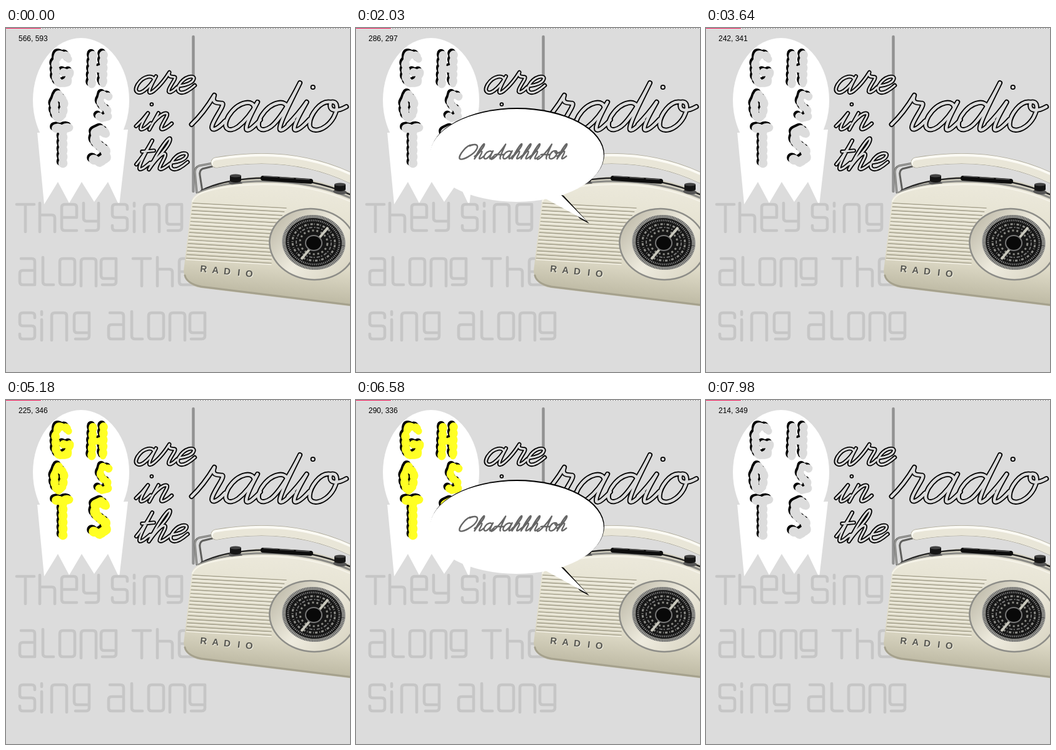
These frames come from a looping animation (550 by 552 pixels, 8000 ms). An HTML page with a canvas:

```html
<!DOCTYPE html>
<html lang="en">
<head>
<meta charset="utf-8">
<title>Ghosts are in the radio</title>
<style>
html, body { margin: 0; width: 100%; height: 100%; overflow: hidden; background: #dcdcdc; }
canvas { display: block; }
</style>
</head>
<body>
<canvas id="stage" width="550" height="552" aria-label="Ghosts are in the radio. They sing along the sing along"></canvas>
<script>
const ctx = document.getElementById('stage').getContext('2d');
const BG = '#dcdcdc';
const LOOP = 8000, STEP = 70;

// Pointer moves: start, end, x, y
const START = [566, 593];
const MOVES = [
  [0, 350, 340, 276], [1330, 1400, 324, 283], [1400, 1820, 240, 310],
  [1890, 2030, 286, 297], [2030, 2240, 322, 287], [2450, 2800, 338, 298],
  [2870, 2940, 338, 299], [3220, 3640, 242, 341], [3640, 3920, 215, 346],
  [4200, 4410, 211, 348], [5110, 5810, 347, 326], [6230, 7070, 210, 349],
  [7840, 7980, 214, 349]
];

// Slanted handwriting, x-height 100: path and advance
const SCRIPT = {
  a: ['M94-76C80-108 22-104 8-50C0-4 36 10 60-12C80-32 92-62 97-98C90-50 86-4 100-1C112 1 122-16 135-36', 125],
  r: ['M0-20C18-45 34-85 42-122C44-92 66-96 84-94C98-90 78-44 80-18C82 4 104 2 122-32', 120],
  e: ['M8-40C50-44 86-60 82-84C76-106 20-102 10-45C5-4 42 10 70-10C85-20 95-32 104-44', 110],
  i: ['M-8-20C8-44 22-76 29-98C22-60 12-4 28-1C42 1 55-18 66-38M30-150h.1', 65],
  n: ['M8 0L22-98M12-38C26-74 52-106 70-95C84-84 62-30 70-8C76 6 98-4 118-36', 115],
  t: ['M0-30C16-62 30-120 38-172C28-100 14-5 34-1C48 1 62-18 78-40M4-106L72-112', 75],
  h: ['M0-30C40-60 78-150 66-180C55-205 25-130 12 0C25-50 50-104 70-93C88-82 62-20 74-4C85 6 105-14 122-34', 120],
  d: ['M94-76C80-108 22-104 8-50C0-4 36 10 60-12C84-36 98-110 104-165C96-90 86-4 102-1C114 1 124-16 137-36', 130],
  o: ['M56-98C10-106-2-50 8-24C18 12 80 8 90-45C95-86 74-102 56-98C58-66 92-62 122-82', 110],
  O: ['M110-170C30-180-20-40 10-5C60 30 190-60 190-130C190-180 130-190 80-160', 200],
  A: ['M-6 6C30 4 82-100 104-180C100-100 88-20 110-1M14-50C50-70 80-40 128-54', 130]
};

// Monoline block letters in a 24 x 42 box
const BLOCK = {
  s: 'M24 8V5q0-5-5-5H5q-5 0-5 5V16q0 5 5 5H19q5 0 5 5V37q0 5-5 5H5q-5 0-5-5V34',
  i: 'M0 11V44M0-2V3',
  n: 'M0 44V5q0-5 5-5H19q5 0 5 5V44',
  g: 'M24 32H5q-5 0-5-5V5q0-5 5-5H24V37q0 5-5 5H2',
  a: 'M2 0H19q5 0 5 5V42H5q-5 0-5-5V24q0-5 5-5H24',
  l: 'M0-2V37q0 5 5 5H17',
  o: 'M5 0H19q5 0 5 5V37q0 5-5 5H5q-5 0-5-5V5q0-5 5-5Z',
  t: 'M-4 0H24M10 0V44',
  h: 'M0-2V44M0 17H19q5 0 5 5V44',
  e: 'M24 42H5q-5 0-5-5V5q0-5 5-5H19q5 0 5 5V21H0',
  y: 'M0-2V22q0 5 5 5H24M24-2V37q0 5-5 5H4'
};
const LYRICS = [
  ['theysing', 283, [21, 54, 89, 124, 170, 205, 221, 257]],
  ['alongthe', 370, [22, 59, 86, 120, 152, 207, 242, 277]],
  ['singalong', 457, [22, 57, 73, 109, 164, 201, 228, 262, 294]]
];

// Dripping letters: radius, then strokes as points
const GHOSTLY = [
  [6, [100, 50, 95, 43, 84, 43, 79, 56, 80, 82, 86, 90, 98, 87, 102, 71, 92, 71]],
  [6, [139, 43, 137, 90], [156, 43, 155, 90], [138, 66, 156, 66]],
  [6, [84, 107, 77, 118, 78, 138, 84, 146, 91, 140, 93, 118, 84, 107]],
  [5.5, [164, 110, 155, 107, 150, 116, 153, 125, 162, 131, 163, 142, 153, 146, 149, 142]],
  [6.5, [80, 161, 101, 160], [91, 162, 91, 217]],
  [7, [160, 170, 152, 163, 143, 168, 142, 182, 150, 190, 159, 196, 160, 208, 150, 215, 140, 211]]
];

const shape = d => new Path2D(d);
const fill = (path, color) => { ctx.fillStyle = color; ctx.fill(path); };
const stroke = (path, color, width) => {
  ctx.strokeStyle = color;
  ctx.lineWidth = width;
  ctx.stroke(path);
};
function ellipse(x, y, rx, ry, tilt = 0) {
  const path = new Path2D();
  path.ellipse(x, y, rx, ry, tilt, 0, 7);
  return path;
}
function gradient(x0, y0, x1, y1, ...colors) {
  const g = ctx.createLinearGradient(x0, y0, x1, y1);
  colors.forEach((c, i) => g.addColorStop(i / (colors.length - 1), c));
  return g;
}

function handwriting(word, x, y, sx, sy = sx) {
  const path = new Path2D();
  for (const c of word) {
    const [d, advance] = SCRIPT[c];
    path.addPath(shape(d), new DOMMatrix([sx, 0, -.4 * sy, sy, x, y]));
    x += advance * sx;
  }
  return path;
}

function lumpy() {
  const path = new Path2D();
  for (const [radius, ...lines] of GHOSTLY) for (const p of lines) {
    for (let k = 2; k < p.length; k += 2) {
      const dx = p[k] - p[k - 2], dy = p[k + 1] - p[k - 1], n = Math.ceil(Math.hypot(dx, dy));
      for (let j = 0; j <= n; j++) {
        const x = p[k - 2] + dx * j / n, y = p[k - 1] + dy * j / n;
        const r = radius + .9 * Math.sin(x * .45 + y * .6);
        path.moveTo(x + r, y);
        path.arc(x, y, r, 0, 7);
      }
    }
  }
  return path;
}

const letters = lumpy();
const titles = [
  [handwriting('are', 203, 104, .27), 6.6, 3],
  [handwriting('in', 208, 163, .29, .27), 6.6, 3],
  [handwriting('the', 205, 227, .27), 6.6, 3],
  [handwriting('radio', 293, 164, .42, .46), 8.2, 4.6]
];
const chant = handwriting('OhaAahhhAoh', 164, 210, .12, .13);

function drawTopEdge() {
  for (let x = 0; x < 550; x += 4) {
    ctx.fillStyle = '#fff';
    ctx.fillRect(x, 0, 2, 1);
    ctx.fillStyle = '#999';
    ctx.fillRect(x + 2, 0, 2, 1);
  }
  ctx.fillStyle = '#f5205f';
  ctx.fillRect(0, 0, 56, 1);
}

function drawGhost(lit) {
  fill(ellipse(120, 116, 77, 100), '#fff');
  fill(shape('M50 168L61 283L83 247L101 281L121 247L141 279L163 247L181 285L195 163Z'), '#fff');
  ctx.save();
  ctx.translate(-3, -3);
  fill(letters, '#000');
  ctx.restore();
  fill(letters, lit ? '#ffff24' : BG);
}

function drawLyrics() {
  for (const [text, y, xs] of LYRICS) xs.forEach((x, i) => {
    ctx.save();
    ctx.translate(x, y);
    stroke(shape(BLOCK[text[i]]), '#c6c6c6', 4.6);
    ctx.restore();
  });
}

function drawDial() {
  const tilt = .12;
  const ring = (rx, ry, color, width) => stroke(ellipse(492, 344, rx, ry, tilt), color, width);
  fill(ellipse(490, 347, 70, 58, tilt), '#8d8d88');
  fill(ellipse(490, 347, 67.5, 55.5, tilt), gradient(430, 300, 545, 400, '#bdb9a8', '#eeebde', '#d8d4c2'));
  fill(ellipse(492, 344, 51, 44, tilt), '#a9a9a5');
  ctx.lineCap = 'butt';
  ctx.setLineDash([1, 1.5]);
  ring(47, 41, '#4a4a48', 6);
  ctx.setLineDash([]);
  fill(ellipse(492, 344, 45, 39, tilt), '#171717');
  for (const [r, dash, width, color] of [
    [41, [1, 2], 3, '#aaa'], [34, [4, 2, 1, 3], 3, '#8c8c88'],
    [28, [2, 2, 5, 3], 2, '#777'], [22, [3, 4], 3, '#8a8a84']
  ]) {
    ctx.setLineDash(dash);
    ring(r, r * .86, color, width);
  }
  ctx.setLineDash([]);
  stroke(shape('M515 320L472 371'), '#c9c8bd', 4);
  fill(ellipse(492, 345, 14, 13), '#777');
  fill(ellipse(492, 345, 12, 11), '#090909');
  ctx.lineCap = 'round';
}

function drawKnob(x, y) {
  fill(ellipse(x, y + 9, 11, 4, .1), '#555');
  ctx.fillStyle = '#151515';
  ctx.fillRect(x - 9, y - 3, 18, 8);
  fill(ellipse(x, y + 5, 9, 3), '#151515');
  fill(ellipse(x, y - 3, 9, 2.5), '#444');
}

function drawRadio() {
  stroke(shape('M330 217L309 221Q302 223 302 232L305 264M330 222L314 226Q309 229 310 236L314 262'), '#5f5f5d', 3);
  stroke(shape('M330 217L309 221Q302 223 302 232L305 264'), '#c9c9c6', 1);
  const handle = shape('M336 216C400 205 480 204 560 245');
  stroke(handle, '#aaa694', 17);
  stroke(handle, '#fbfaf4', 15.5);
  stroke(shape('M336 218C400 207 480 206 560 247'), '#e9e6d8', 11);

  // Top plate with chrome rim
  fill(shape('M303 268Q335 245 400 239Q490 234 556 267V300H303Z'), '#d4d1c2');
  stroke(shape('M312 261Q345 244 400 241Q490 238 556 270'), '#262626', 2.5);
  stroke(shape('M308 264Q345 248 400 246Q490 244 556 275'), '#8b8b87', 3);
  drawKnob(367, 240);
  drawKnob(534, 254);
  stroke(shape('M411 241L487 246'), '#0d0d0d', 8);
  stroke(shape('M412 238L434 239M438 240L460 241M464 242L485 243'), '#565656', 1.5);

  const body = shape('M297 279Q298 268 315 262Q350 249 410 248Q490 247 556 278V447L312 417Q286 413 284 390Z');
  fill(body, gradient(380, 250, 360, 428, '#ebe8da', '#e5e2d1', '#dedac7', '#bbb7a1'));
  stroke(shape('M298 278Q302 269 315 264Q350 252 410 251Q490 250 556 281'), '#f6f4ea', 2);
  stroke(shape('M286 397Q289 410 312 415L556 445'), '#a5a18d', 3);

  ctx.save();
  ctx.clip(body);
  for (let i = 0; i < 16; i++) {
    const y = 281 + i * 5.9, left = 299 - i * .7;
    const right = 448 - 24 * Math.sin(Math.min(1, i / 11) * Math.PI / 2);
    const line = shape(`M${left} ${y}L${right} ${y + 8}`);
    stroke(line, '#aaa692', 1.7);
    ctx.translate(0, 2);
    stroke(line, '#f3f0e4', 1.3);
    ctx.translate(0, -2);
  }
  ctx.restore();
  drawDial();

  ctx.save();
  ctx.translate(310, 391);
  ctx.rotate(.105);
  ctx.font = 'bold 15px "Liberation Sans", Arial, sans-serif';
  [...'RADIO'].forEach((c, i) => {
    const x = [0, 19, 38, 60, 73][i];
    ctx.fillStyle = '#f4f2e6';
    ctx.fillText(c, x + 1, 1);
    ctx.fillStyle = '#555550';
    ctx.fillText(c, x, 0);
  });
  ctx.restore();
}

function drawBubble() {
  fill(ellipse(258, 203, 139, 75), '#000');
  fill(shape('M322 266L332 269L373 314L358 306Z'), '#000');
  fill(ellipse(257, 204.5, 139, 74.5), '#fff');
  fill(shape('M296 270L326 266L369 310Z'), '#fff');
  stroke(chant, '#666', 2.4);
}

function pointerAt(t) {
  let [x, y] = START;
  for (const [from, to, nx, ny] of MOVES) {
    if (t <= from) break;
    const k = Math.min(1, (t - from) / (to - from));
    x += (nx - x) * k;
    y += (ny - y) * k;
  }
  return [Math.round(x), Math.round(y)];
}

function draw(t) {
  const [x, y] = pointerAt(t);
  const overRadio = x >= 285 && x < 550 && y > 200 && y < 446;
  ctx.lineCap = ctx.lineJoin = 'round';
  ctx.fillStyle = BG;
  ctx.fillRect(0, 0, 550, 552);
  drawTopEdge();
  drawGhost(t >= 4340 && t < 7490);
  stroke(shape('M299.5 14V262'), '#929292', 4.5);
  drawLyrics();
  for (const [path, outer, inner] of titles) {
    stroke(path, '#000', outer);
    stroke(path, BG, inner);
  }
  drawRadio();
  if (overRadio) drawBubble();
  ctx.fillStyle = '#000';
  ctx.font = '12px "Liberation Sans", Arial, sans-serif';
  ctx.fillText(`${x}, ${y}`, 20, 21);
}

const began = performance.now();
let shown = -1;
function tick() {
  const t = (performance.now() - began) % LOOP;
  const step = Math.floor(t / STEP);
  if (step !== shown) draw((shown = step) * STEP);
  requestAnimationFrame(tick);
}
tick();
</script>
</body>
</html>
```
